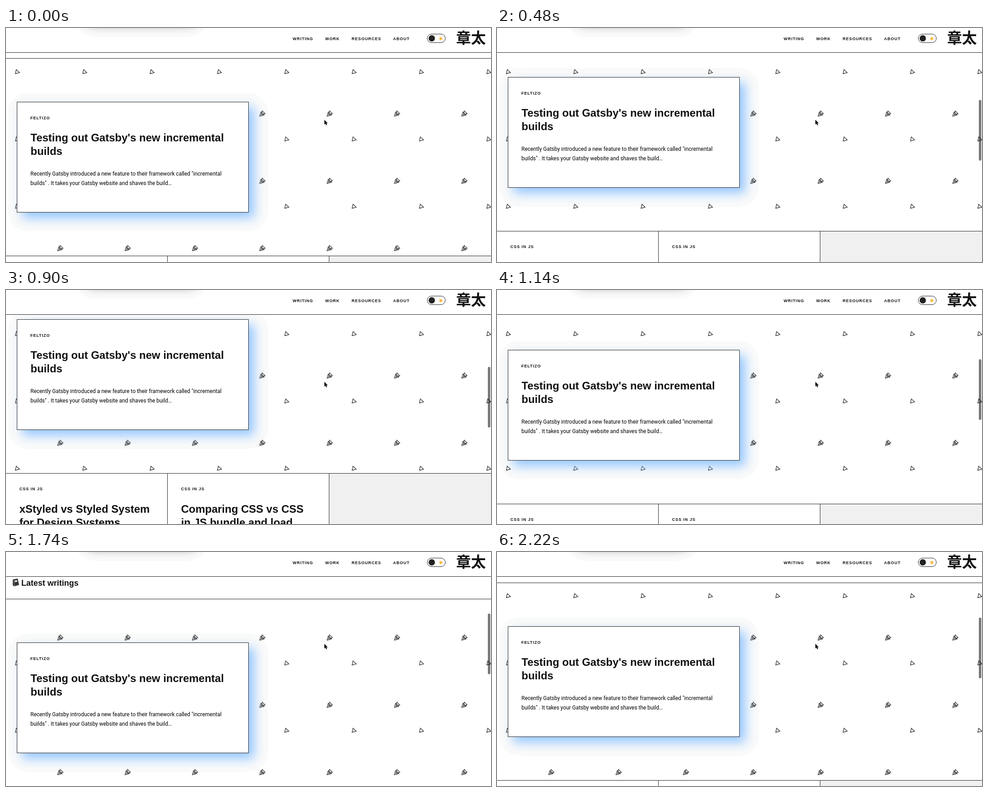
Animation of 1077 by 520 pixels, one loop 2340 ms. Source, as an HTML page:

```html
<!DOCTYPE html>
<html lang="en">
<head>
<meta charset="utf-8">
<title>Latest writings</title>
<style>
  html, body { margin: 0; width: 100%; height: 100%; overflow: hidden; background: #fff; }
  svg { display: block; }
  text { fill: #111; }
  .title, .label, .heading { font-family: "Liberation Sans", Arial, sans-serif; font-weight: 700; }
  .title { font-size: 24px; }
  .heading { font-size: 18px; }
  .label { font-size: 9px; letter-spacing: .97px; }
  .body { font: 11.95px Roboto, sans-serif; fill: #000; }
  .mark { font: 900 33px "Noto Sans CJK JP", "Noto Sans CJK", sans-serif; }
  .line { fill: #222; }
</style>
</head>
<body>
<svg width="1077" height="520" viewBox="0 0 1077 520">
  <defs>
    <pattern id="triangles" x="15" y="87" width="149.55" height="149.55" patternUnits="userSpaceOnUse">
      <g fill="none" stroke="#111" stroke-width="1.15">
        <path d="M7.8 5.3L15 12.2L5.8 14.6Z"/>
        <path d="M105.3 97L111.7 103.3L103.3 105.6Z"/>
        <path d="M102.5 99.5L109.6 106.3L99.7 108.8Z"/>
      </g>
    </pattern>
    <filter id="blur" x="-30%" y="-40%" width="160%" height="180%">
      <feGaussianBlur stdDeviation="12"/>
    </filter>
    <clipPath id="halo"><rect x="4" y="-20" width="578" height="308" rx="45"/></clipPath>
    <clipPath id="navHalo"><rect x="152" y="-100" width="297" height="120" rx="45"/></clipPath>
  </defs>

  <rect width="1077" height="520" fill="url(#triangles)"/>

  <g id="page">
    <rect y="-300" width="1077" height="203" fill="#fff"/>
    <rect class="line" y="-97" width="1077" height="1"/>
    <g transform="translate(14 -142)">
      <path d="M1 2L12 0L15 14L4 17L1 15Z" fill="#333"/>
      <path d="M4 17L15 14L15 15.5L5 18Z" fill="#bbb"/>
      <path d="M5 4.5L10.5 3.3L11.3 7L5.8 8.2Z" fill="#ddd"/>
      <path d="M2.6 2L4.8 16" stroke="#888" fill="none"/>
    </g>
    <text class="heading" x="34" y="-126">Latest writings</text>

    <g clip-path="url(#halo)">
      <rect x="4" y="-20" width="578" height="308" fill="#000" opacity=".02"/>
      <rect x="36" y="12" width="515" height="246" fill="#93c6ff" filter="url(#blur)"/>
    </g>
    <rect x="24.5" y=".5" width="514" height="245" fill="#fff" stroke="#222"/>
    <text class="label" x="54" y="39">FELTIZO</text>
    <text class="title" x="54.5" y="88">Testing out Gatsby's new incremental</text>
    <text class="title" x="54.5" y="118">builds</text>
    <text class="body" x="54.3" y="164">Recently Gatsby introduced a new feature to their framework called "incremental</text>
    <text class="body" x="54.3" y="185">builds" . It takes your Gatsby website and shaves the build…</text>

    <g transform="translate(0 342)">
      <rect width="1077" height="300" fill="#fff"/>
      <rect x="718" width="359" height="300" fill="#f0f0f0"/>
      <rect class="line" width="1077" height="1"/>
      <rect class="line" x="358" width="1" height="300"/>
      <rect class="line" x="717" width="1" height="300"/>
      <text class="label" x="29.7" y="38">CSS IN JS</text>
      <text class="title" x="29.7" y="88">xStyled vs Styled System</text>
      <text class="title" x="29.7" y="118">for Design Systems</text>
      <text class="label" x="388.7" y="38">CSS IN JS</text>
      <text class="title" x="388.7" y="88">Comparing CSS vs CSS</text>
      <text class="title" x="388.7" y="118">in JS bundle and load</text>
    </g>
  </g>

  <g id="nav">
    <rect width="1077" height="54" fill="#fff"/>
    <rect class="line" y="54" width="1077" height="1"/>
    <g clip-path="url(#navHalo)">
      <rect x="152" y="-100" width="297" height="120" fill="#000" opacity=".02"/>
      <rect x="184" y="-112" width="233" height="100" fill="#000" opacity=".7" filter="url(#blur)"/>
    </g>
    <text class="label" x="636.5" y="27">WRITING</text>
    <text class="label" x="708.7" y="27">WORK</text>
    <text class="label" x="767.5" y="27">RESOURCES</text>
    <text class="label" x="859.5" y="27">ABOUT</text>
    <rect x="935.5" y="13.5" width="40" height="19" rx="9.5" fill="#fff" stroke="#222"/>
    <circle cx="945.5" cy="23" r="7" fill="#222"/>
    <circle cx="965.5" cy="23.5" r="4" fill="none" stroke="#f8c560" stroke-width="1.3" stroke-dasharray="1.4 1.74"/>
    <circle cx="965.5" cy="23.5" r="2.8" fill="#f9b42d"/>
    <text class="mark" x="999.5" y="33.5">章太</text>
  </g>

  <rect id="scrollbar" x="1070" width="5.5" height="135" rx="2.75" fill="#000" opacity=".53"/>
  <path d="M707 204V214.6L709.4 212.5L711 216.2L712.9 215.4L711.3 211.8H714.4Z"
        fill="#000" stroke="#fff" stroke-width=".8" paint-order="stroke"/>
</svg>
<script>
  const LOOP = 2340, STEP = 60, LAST = 2220, SCROLL_START = 240;
  const page = document.getElementById('page');
  const scrollbar = document.getElementById('scrollbar');

  // time (ms), card top (px), velocity (px/ms)
  const path = [
    [180, 164, 0], [360, 143, -.2], [660, 56, -.2], [760, 47, 0], [1140, 133, .25],
    [1380, 170, .11], [1740, 201, .05], [1800, 203, 0], [2220, 165, -.03]
  ];

  function cardTop(t) {
    if (t <= path[0][0]) return path[0][1];
    const i = Math.max(1, path.findIndex(p => t <= p[0]));
    const [t0, y0, v0] = path[i - 1], [t1, y1, v1] = path[i];
    const d = t1 - t0, u = (t - t0) / d, w = 1 - u;
    return w * w * ((1 + 2 * u) * y0 + u * d * v0) + u * u * ((3 - 2 * u) * y1 - w * d * v1);
  }

  function draw(now) {
    const t = Math.min(LAST, Math.floor((now % LOOP) / STEP) * STEP);
    const y = Math.round(cardTop(t));
    page.setAttribute('transform', `translate(0 ${y})`);
    scrollbar.setAttribute('y', 151.3 + (143 - y) / 4);
    scrollbar.setAttribute('visibility', t < SCROLL_START ? 'hidden' : 'visible');
  }

  const start = performance.now();
  function tick() {
    draw(performance.now() - start);
    requestAnimationFrame(tick);
  }
  tick();
</script>
</body>
</html>
```
